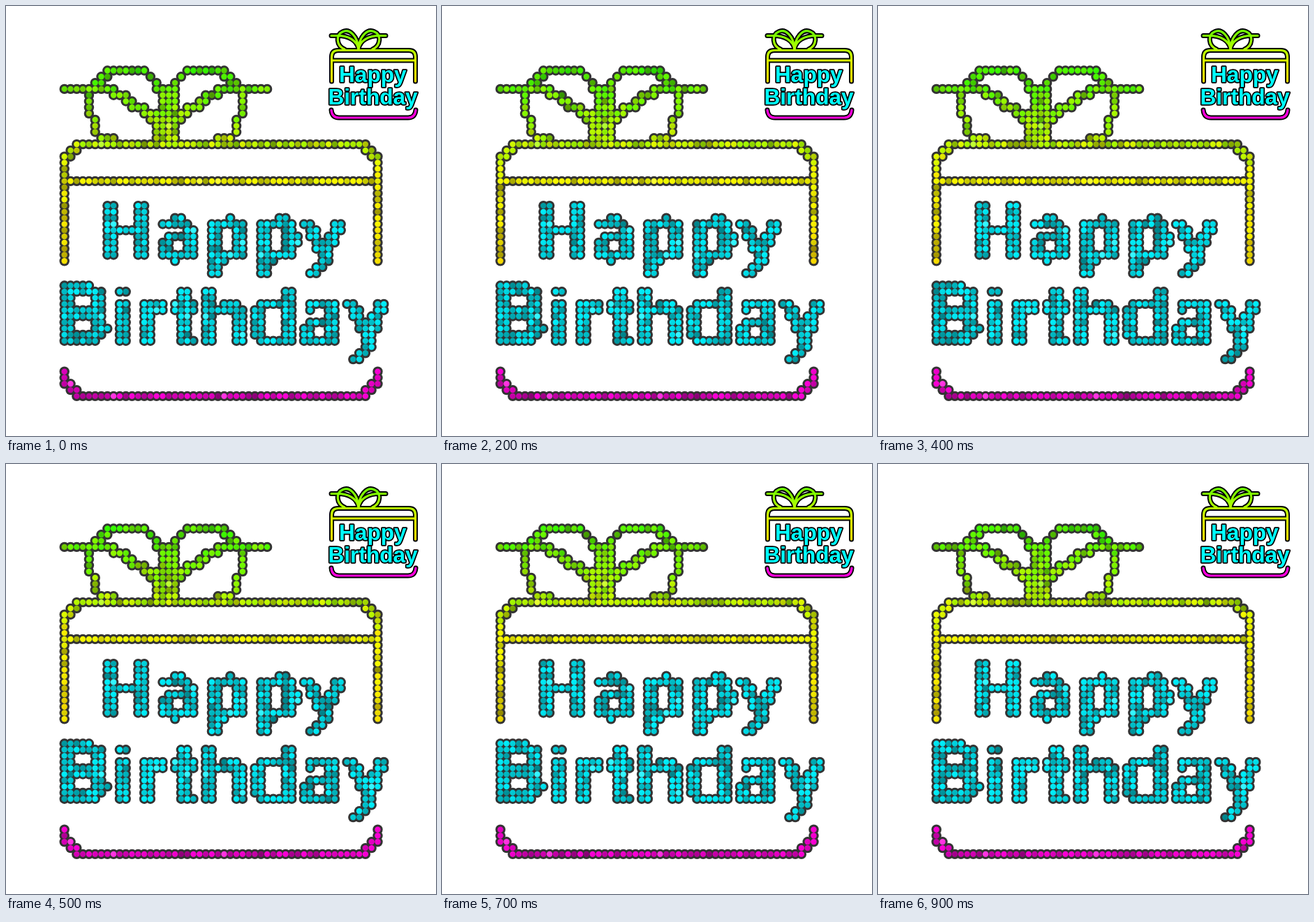
Animation, 616 px wide and 616 px high, one loop 1000 ms. Source, as an HTML page with a canvas:

```html
<!DOCTYPE html>
<html lang="en">
<head>
<meta charset="utf-8">
<title>Happy Birthday lights</title>
<style>
  html, body { margin: 0; width: 100%; height: 100%; overflow: hidden; background: #fff; }
  canvas, svg { position: absolute; left: 0; top: 0; width: 616px; height: 616px; }
  .edge { stroke: #000; stroke-width: 7; }
  .fill { stroke-width: 3.2; }
  text {
    font: bold 31.6px "Liberation Sans", Arial, sans-serif;
    fill: #0ff; stroke: #000; stroke-width: 3.6; stroke-linejoin: round; paint-order: stroke;
  }
</style>
</head>
<body>
<canvas id="sign" width="616" height="616"></canvas>
<svg viewBox="0 0 616 616">
  <defs>
    <linearGradient id="lime" gradientUnits="userSpaceOnUse" x1="0" y1="32" x2="0" y2="110">
      <stop offset="0" stop-color="#6f0"/>
      <stop offset=".6" stop-color="#df0"/>
      <stop offset="1" stop-color="#fd0"/>
    </linearGradient>
    <path id="loop" d="M485 62C473 57 472 41 482 37C492 32 504 43 505 62M466 42.5H475C490 42.500 503 49 505 62"/>
    <g id="gift">
      <use href="#loop"/>
      <use href="#loop" transform="matrix(-1 0 0 1 1010 0)"/>
      <path d="M466.500 108V73Q466.500 63.500 476 63.500H577Q586.500 63.500 586.500 73V108M466.500 78H586.500"/>
    </g>
    <path id="base" d="M466 149Q467 160 477 160H576Q586 160 587 149"/>
  </defs>
  <g fill="none" stroke-linecap="round" stroke-linejoin="round">
    <use href="#gift" class="edge"/>
    <use href="#gift" class="fill" stroke="url(#lime)"/>
    <use href="#base" class="edge"/>
    <use href="#base" class="fill" stroke="#f0d"/>
  </g>
  <text x="477" y="108.500">Happy</text>
  <text x="461.500" y="141">Birthday</text>
</svg>
<script>
const PITCH = 8.8, LEFT = 83.7, TOP = 92.5, STEP = 100, STEPS = 10;
const ctx = document.getElementById('sign').getContext('2d');
const lamps = new Map();

function lamp(c, r, kind) {
  lamps.set(c + ',' + r, { c, r, kind, x: LEFT + c * PITCH, y: TOP + r * PITCH });
}

// Filled block of lamps
function block(c, r, w, h, kind = 'text') {
  for (let i = 0; i < w * h; i++) lamp(c + i % w, r + Math.floor(i / w), kind);
}

// Polyline through key points with a brush some lamps wide
function trace(points, w = 1, kind = 'text', mirror = 0) {
  points.slice(1).forEach(([c1, r1], k) => {
    const [c0, r0] = points[k];
    const n = Math.max(Math.abs(c1 - c0), Math.abs(r1 - r0));
    for (let i = 0; i <= n * w + w - 1; i++) {
      const t = Math.floor(i / w) / n;
      const c = Math.round(c0 + (c1 - c0) * t) + i % w, r = Math.round(r0 + (r1 - r0) * t);
      lamp(c, r, kind);
      if (mirror) lamp(mirror - c, r, kind);
    }
  });
}

// Bow, mirrored around its stem
const bow = (points, w) => trace(points, w, 'lid', 33);
bow([[0, 3], [7, 3]]);
bow([[15, 3], [15, 2], [13, 0], [7, 0], [4, 3], [4, 7], [5, 8], [5, 10], [6, 11], [8, 11]]);
bow([[5, 2], [6, 1]], 2);
bow([[6, 3], [9, 4], [14, 8]], 2);
block(16, 3, 3, 9, 'lid');
block(15, 7, 4, 5, 'lid');

// Box, mirrored around its middle
const box = (points, kind, w) => trace(points, w, kind, 51);
box([[0, 31], [0, 14], [2, 12], [26, 12]], 'lid');
box([[0, 14], [1, 13]], 'lid', 2);
box([[0, 18], [26, 18]], 'lid');
box([[0, 49], [0, 51], [2, 53], [26, 53]], 'base');
box([[0, 51], [1, 52]], 'base', 2);

// Letter parts and letters
function ring(c, r, w, h, cut = 0) {
  block(c + 1, r, w - 1, 1);
  block(c + cut, r + h - 1, w - cut, 1);
  block(c, r + 1, 2, h - 2);
  block(c + w - 2, r + 1, 2, h - 2);
}
const stem = (c, r, h) => block(c, r, 2, h);
function a(c, r, h, hook) {
  block(hook, r, 5, 1);
  stem(c + 4, r + 1, h - 1);
  ring(c, r + h - 4, 6, 4);
}
function p(c) {
  stem(c, 25, 9);
  ring(c, 25, 6, 6);
  block(c, 31, 3, 1);
  lamp(c + 3, 24, 'text');
}
function y(c, r, h) {
  trace([[c, r], [c + 2, r + 4]], 2);
  trace([[c + 5, r], [c + 3, r + h - 3], [c + 3, r + h - 2], [c + 1, r + h]], 2);
}

// Happy
stem(7, 22, 9);
stem(12, 22, 9);
block(9, 26, 3, 1);
a(16, 25, 6, 16);
block(18, 24, 2, 1);
lamp(18, 31, 'text');
p(24);
p(32);
lamp(36, 24, 'text');
block(38, 27, 1, 2);
y(39, 25, 8);

// Birthday
block(0, 35, 5, 1);
ring(0, 36, 7, 4);
ring(0, 40, 7, 4);
stem(0, 36, 9);
block(0, 44, 6, 1);
lamp(7, 42, 'text');
block(9, 36, 2, 1);
stem(9, 38, 7);
stem(13, 38, 7);
block(15, 38, 2, 2);
stem(19, 36, 9);
block(18, 38, 4, 2);
lamp(21, 44, 'text');
stem(23, 36, 9);
block(26, 38, 3, 1);
block(25, 39, 5, 1);
stem(28, 40, 5);
ring(31, 38, 7, 7, 1);
stem(36, 36, 9);
a(39, 38, 7, 40);
lamp(40, 39, 'text');
y(46, 38, 9);

// Repeatable noise in 0..1
function noise(a, b, c) {
  let h = Math.imul(a + 11, 374761393) ^ Math.imul(b + 7, 668265263) ^ Math.imul(c + 3, 974634777);
  h = Math.imul(h ^ h >>> 15, 2246822519);
  h = Math.imul(h ^ h >>> 13, 3266489917);
  return ((h ^ h >>> 16) >>> 0) / 4294967296;
}

function hue({ c, r, kind }, step) {
  if (kind === 'text') return 183;
  if (kind === 'base') return 309;
  const jitter = (noise(c, r, 50 + step) - .5) * (r < 18 ? 16 : 4);
  return (r < 18 ? 101 - 2.3 * r : 61 - .5 * (r - 18)) + jitter;
}

function light({ c, r, kind }, step) {
  const own = noise(c, r, 90);
  if (own > .975) return 62;
  const level = (own + noise(c, r, step)) * .85 + (kind === 'lid' ? .05 : -.12);
  return 28 + 22 * Math.min(1, Math.max(0, level));
}

function disc(x, y, radius) {
  ctx.beginPath();
  ctx.arc(x, y, radius, 0, 7);
  ctx.fill();
}

function draw(step) {
  ctx.clearRect(0, 0, 616, 616);
  ctx.fillStyle = '#333';
  for (const p of lamps.values()) disc(p.x, p.y, 7.2);
  for (const p of lamps.values()) {
    const h = hue(p, step), l = light(p, step);
    const shade = ctx.createLinearGradient(p.x - 3, p.y - 3, p.x + 3, p.y + 3);
    shade.addColorStop(0, `hsl(${h} 100% ${l}%)`);
    shade.addColorStop(1, `hsl(${h} 100% ${l * .94}%)`);
    ctx.fillStyle = shade;
    disc(p.x, p.y, 4.2);
  }
}

const start = performance.now();
let shown = -1;
function tick() {
  const step = Math.floor((performance.now() - start) / STEP) % STEPS;
  if (step !== shown) draw(shown = step);
  requestAnimationFrame(tick);
}
tick();
</script>
</body>
</html>
```
